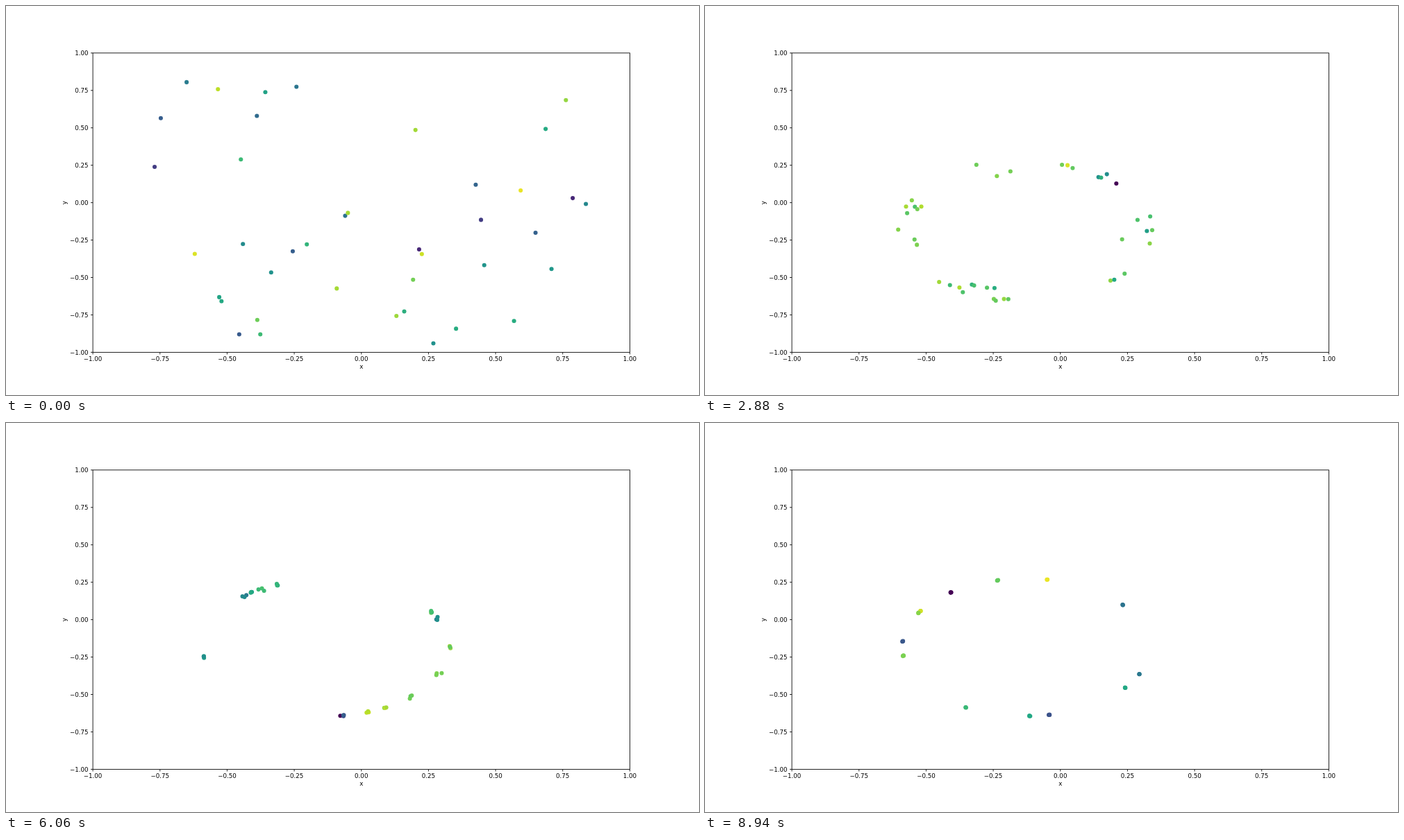
These frames come from a looping animation (998x561 px, 9000 ms). An HTML page:

```html
<!DOCTYPE html>
<html lang="en">
<head>
<meta charset="utf-8">
<title>Swarm scatter</title>
<style>
  html, body { margin: 0; width: 100%; height: 100%; overflow: hidden; background: #fff; }
  svg { display: block; width: 100%; height: 100%; }
  text { font: 8.66px "DejaVu Sans", sans-serif; fill: #000; }
  .axis { stroke: #000; stroke-width: .87; fill: none; }
</style>
</head>
<body>
<svg id="stage" viewBox="0 0 998 561"></svg>
<script>
const LOOP = 9000, STEP = 60, LAST = LOOP - STEP;
const COUNT = 40;
const SPIN = 73;                        // degrees per second around the ring
const GATHER = 1000, SETTLE = 1800;     // fall onto the ring, then clump (ms)
const RING = { x: -0.13, y: -0.185, r: 0.46 };
const BOX = { l: 125.1, r: 898.4, t: 67.8, b: 499.4 };
const UX = (BOX.r - BOX.l) / 2, UY = (BOX.b - BOX.t) / 2;
const RAD = Math.PI / 180;
const VIRIDIS = ['#440154', '#482475', '#414487', '#355f8d', '#2a788e', '#21918c',
  '#22a884', '#44bf70', '#7ad151', '#bddf26', '#fde725']
  .map(h => [1, 3, 5].map(i => parseInt(h.slice(i, i + 2), 16)));

// Closing angle and colour percent of each clump, by sense of rotation.
const LEFT_TURN = [[127, 0], [148, 93], [187, 80], [241, 67], [324, 60], [337, 40], [38, 38]];
const RIGHT_TURN = [[150, 82], [272, 60], [103, 76], [80, 97], [175, 27], [281, 25]];

const stage = document.getElementById('stage');
const mix = (a, b, u) => a + (b - a) * u;
const wrap = a => ((a + 180) % 360 + 360) % 360 - 180;
const smooth = u => u * u * (3 - 2 * u);
const px = x => BOX.l + UX * (1 + x);
const py = y => BOX.b - UY * (1 + y);

let seed = 29;
function rand(lo = 0, hi = 1) {
  seed = (seed + 0x6D2B79F5) | 0;
  let v = Math.imul(seed ^ (seed >>> 15), 1 | seed);
  v = (v + Math.imul(v ^ (v >>> 7), 61 | v)) ^ v;
  return mix(lo, hi, ((v ^ (v >>> 14)) >>> 0) / 4294967296);
}

function add(tag, attrs, parent = stage) {
  const el = document.createElementNS('http://www.w3.org/2000/svg', tag);
  for (const k in attrs) el.setAttribute(k, attrs[k]);
  return parent.appendChild(el);
}

function label(str, x, y, anchor, extra) {
  add('text', { x, y, 'text-anchor': anchor, ...extra }).textContent = str;
}

function viridis(c) {
  const v = Math.min(Math.max(c, 0), 100) / 10;
  const i = Math.min(Math.floor(v), 9);
  return `rgb(${VIRIDIS[i].map((a, k) => Math.round(mix(a, VIRIDIS[i + 1][k], v - i)))})`;
}

const clump = dir => ([ang, color]) => ({ ang, color, dir });
const clumps = [...LEFT_TURN.map(clump(1)), ...RIGHT_TURN.map(clump(-1))];
const orbit = (c, t) => c.ang + c.dir * SPIN * (t - LAST) / 1000;

// Dots lie below the frame and ticks.
const clip = add('clipPath', { id: 'plot' });
add('rect', { x: BOX.l, y: BOX.t, width: 2 * UX, height: 2 * UY }, clip);
const swarm = add('g', { 'clip-path': 'url(#plot)' });

const free = Array.from({ length: COUNT }, () => {
  const x = rand(-0.9, 0.9) - RING.x, y = rand(-0.95, 0.99) - RING.y;
  return { ang: Math.atan2(y, x) / RAD, r: Math.hypot(x, y) };
});

// Each clump in turn takes the free dot closest in angle.
const dots = Array.from({ length: COUNT }, (_, i) => {
  const home = clumps[i % clumps.length];
  const gap = d => wrap(d.ang - orbit(home, 0));
  free.sort((a, b) => Math.abs(gap(a)) - Math.abs(gap(b)));
  const start = free.shift();
  return {
    home,
    el: add('circle', { r: 3.03 }, swarm),
    turn: [gap(start), rand(-40, 40)],
    reach: [start.r - RING.r, rand(0, 0.12) - 0.5 * rand() ** 3],
    color: [rand(10, 98), i ? rand(62, 98) : 0, home.color],
  };
});

add('rect', { class: 'axis', x: BOX.l, y: BOX.t, width: 2 * UX, height: 2 * UY });
for (let i = -4; i <= 4; i++) {
  const v = i / 4, x = px(v), y = py(v);
  const str = v.toFixed(2).replace('-', '\u2212');
  add('path', { class: 'axis', d: `M${x} ${BOX.b}v3.03M${BOX.l} ${y}h-3.03` });
  label(str, x, 511.7, 'middle');
  label(str, 118.6, y + 3.2, 'end');
}
label('x', px(0), 522.7, 'middle');
label('y', 0, 0, 'middle', { transform: `translate(86.7 ${py(0)}) rotate(-90)` });

function draw(t) {
  const pull = smooth(Math.min(t / GATHER, 1));
  const fade = Math.exp(-t / SETTLE);
  const late = Math.max(0, (t - GATHER) / (LAST - GATHER));
  for (const { home, el, turn, reach, color } of dots) {
    const ang = (orbit(home, t) + mix(...turn, pull) * fade) * RAD;
    const r = RING.r + mix(...reach, pull) * fade;
    el.setAttribute('cx', px(RING.x + r * Math.cos(ang)).toFixed(2));
    el.setAttribute('cy', py(RING.y + r * Math.sin(ang)).toFixed(2));
    el.setAttribute('fill', viridis(mix(mix(color[0], color[1], pull), color[2], late)));
  }
}

const born = performance.now();
function tick() {
  const t = (performance.now() - born) % LOOP;
  draw(Math.floor(t / STEP) * STEP);
  requestAnimationFrame(tick);
}
tick();
</script>
</body>
</html>
```
